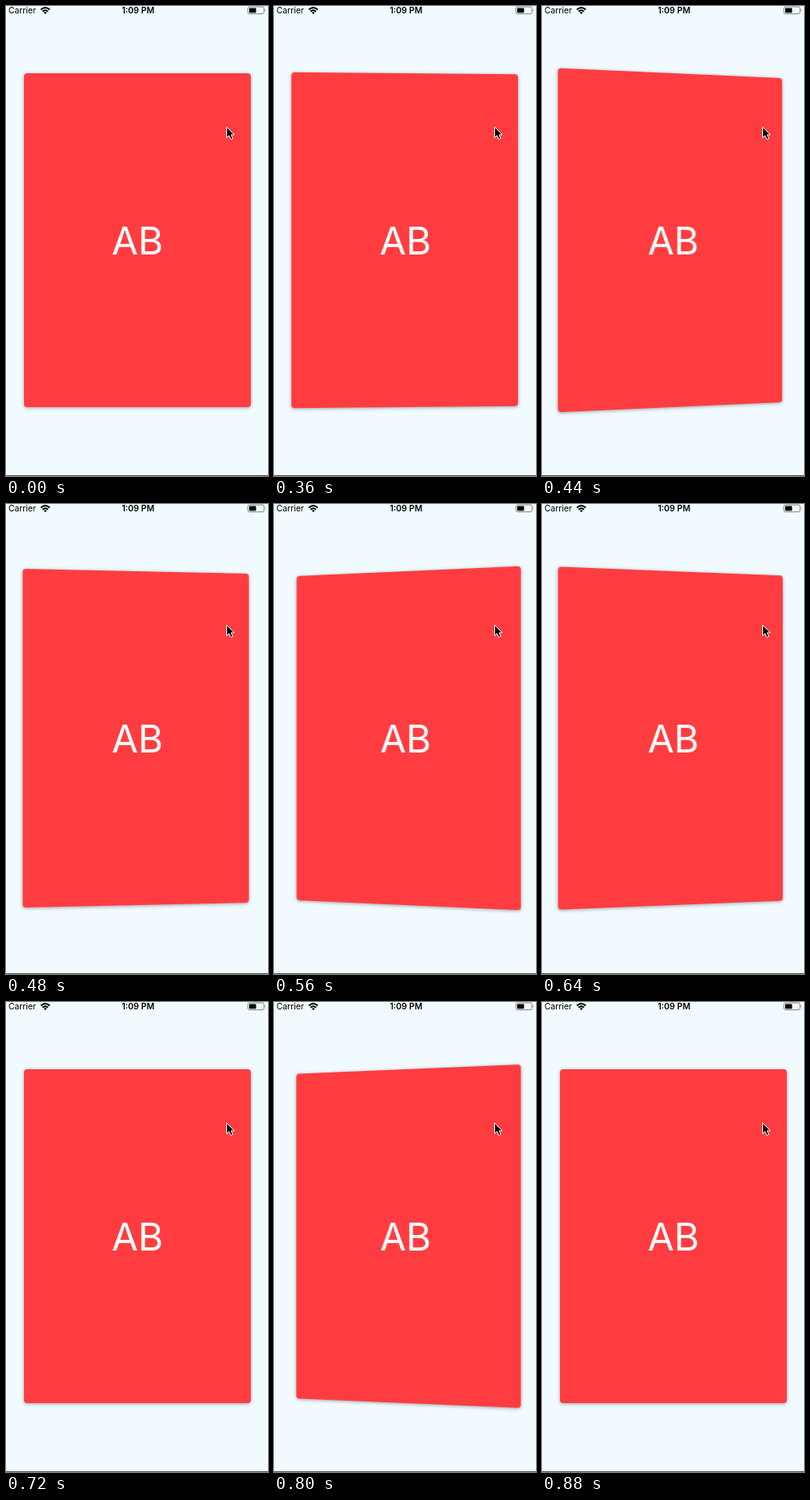
These frames come from a looping animation (320x573 px, 1.52 s). An HTML page:

```html
<!DOCTYPE html>
<html lang="en">
<head>
<meta charset="utf-8">
<title>Card jiggle</title>
<style>
  html, body { margin: 0; width: 100%; height: 100%; overflow: hidden; }
  body { position: relative; background: #f1faff; font-family: Inter, "Liberation Sans", sans-serif; }
  #card {
    position: absolute; left: 22px; top: 82px; width: 277px; height: 407px;
    border-radius: 4px; background: #ff3d41;
    box-shadow: 0 1px 4px rgba(0, 0, 0, .35);
    color: #fff; font-size: 47px; line-height: 408px; text-align: center;
  }
  svg { position: absolute; left: 0; top: 0; }
</style>
</head>
<body>
<div id="card">AB</div>
<svg width="320" height="573" viewBox="0 0 320 573">
  <g font-size="10.3" fill="#000">
    <text x="3" y="9.4">Carrier</text>
    <text x="161.3" y="9.4" text-anchor="middle" font-weight="600">1:09 PM</text>
  </g>
  <g fill="none" stroke="#000" stroke-width="1.9">
    <path d="M42.6 4.5Q48 -.7 53.4 4.5"/>
    <path d="M44.7 6.7Q48 3.6 51.3 6.7"/>
  </g>
  <path d="M46.1 8Q48 6.3 49.9 8L48 10Z"/>
  <rect x="295.5" y="1" width="19.6" height="8.6" rx="2" fill="none" stroke="#777" stroke-width=".9"/>
  <rect x="297" y="2.4" width="8.4" height="5.8" rx=".7"/>
  <path d="M316.2 3.8Q317.8 5.3 316.2 6.8Z" fill="#777"/>
  <path d="M269.5 147.5V160.6L272.4 157.9L274.5 162.6L277 161.5L275 156.9H278.9Z"
        stroke="#fff" stroke-width="1" stroke-linejoin="round"/>
  <rect y="572" width="320" height="1" fill="#555"/>
</svg>
<script>
  const LOOP = 1520, STEP = 40, SWING = 9, DEPTH = 720;
  const keys = [[324, 0], [438, 1], [555, -1], [657, 1], [783, -1], [880, 0]];
  const card = document.getElementById("card");

  const easeInOut = p => p < .5 ? 2 * p * p : 1 - 2 * (1 - p) * (1 - p);

  function swingAt(t) {
    for (let i = 1; i < keys.length; i++) {
      const [t0, a] = keys[i - 1], [t1, b] = keys[i];
      if (t >= t0 && t < t1) return a + (b - a) * easeInOut((t - t0) / (t1 - t0));
    }
    return 0;
  }

  function draw(now) {
    const t = Math.floor((now % LOOP) / STEP) * STEP;
    const angle = t < 360 ? 0 : SWING * swingAt(t);
    card.style.transform = `perspective(${DEPTH}px) rotateY(${angle.toFixed(3)}deg)`;
  }

  const start = performance.now();
  function tick() {
    draw(performance.now() - start);
    requestAnimationFrame(tick);
  }
  tick();
</script>
</body>
</html>
```
